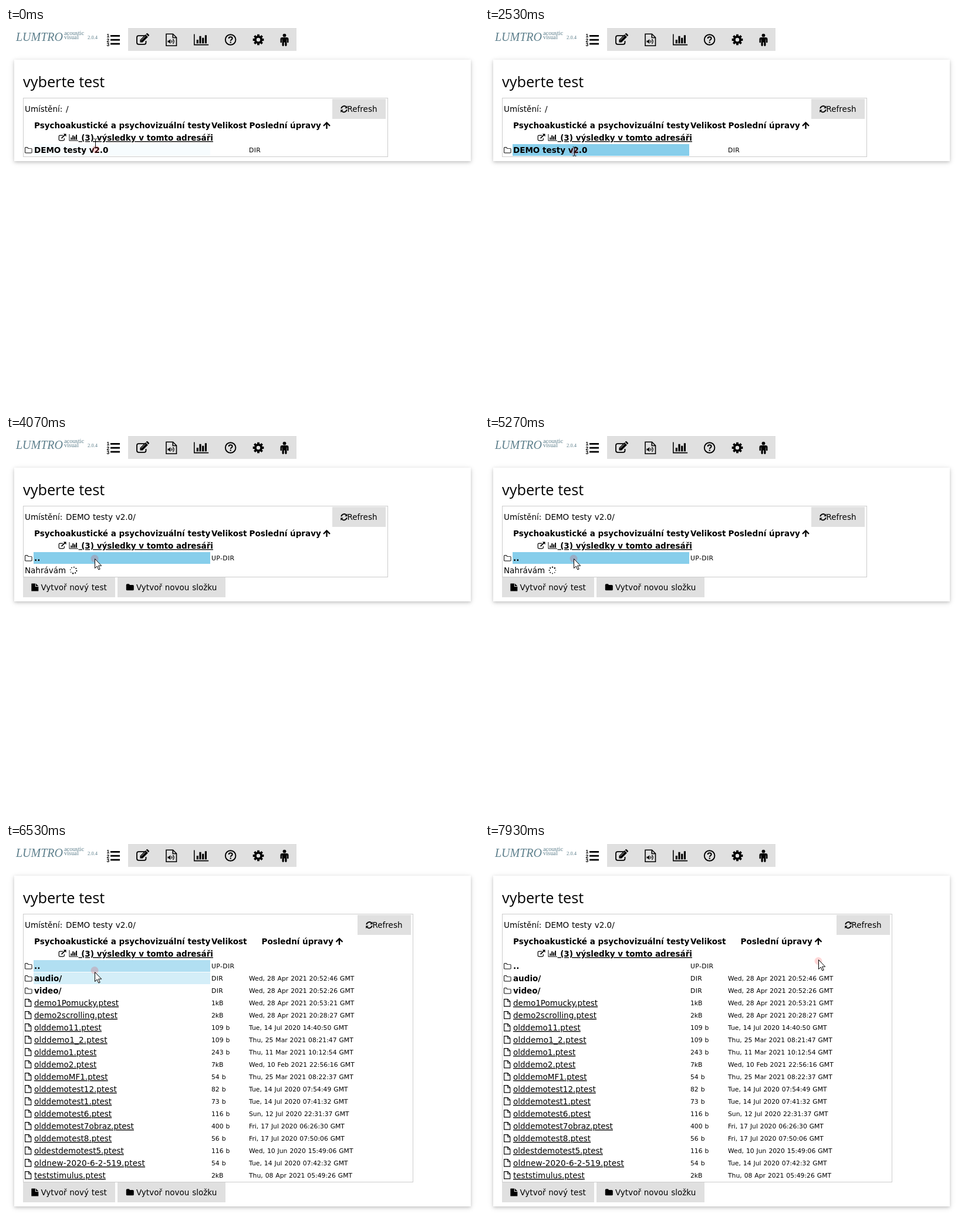
Animation, 806 px wide and 648 px high, one loop 8000 ms. Source, as an HTML page:

```html
<!DOCTYPE html>
<html lang="cs">
<head>
<meta charset="utf-8">
<title>vyberte test</title>
<style>
html, body { margin: 0; width: 100%; height: 100%; overflow: hidden; background: #fff; }
#card { position: absolute; left: 14px; top: 54px; width: 778px; background: #fff;
  box-shadow: 0 2px 5px rgba(0,0,0,.16), 0 2px 10px rgba(0,0,0,.12); }
svg { position: absolute; left: 0; top: 0; display: block; }
text { font: 13.5px "DejaVu Sans", sans-serif; word-spacing: .5px; white-space: pre; }
.b { font-weight: bold; word-spacing: 0; }
.u { text-decoration: underline 1px; }
.s { font-size: 10.8px; word-spacing: .5px; }
.h { font: 25.3px "Open Sans", sans-serif; word-spacing: 0; }
.logo { font: italic 20px "Liberation Serif", serif; fill: #5d7f8c; }
.tag { font: 10.4px "Liberation Serif", serif; fill: #5d7f8c; }
.ver { font: 8.5px "Liberation Serif", serif; fill: #5d7f8c; }
.num { font: bold 8.5px "Liberation Sans", sans-serif; }
.l { fill: none; stroke: #000; }
.btn { fill: #e0e0e0; }
.hl { fill: #87ceeb; }
</style>
</head>
<body>
<div id="card"></div>
<svg id="stage" width="806" height="648" viewBox="0 0 806 648"></svg>
<script>
const LOOP = 8000, STEP = 1000 / 15;
const OPEN = 3266, LOADED = 5866, DOWN = 6466, LEAVE = 7333;

const text = (x, y, s, cls = '', gap = 0) =>
  `<text x="${x}" y="${y}" class="${cls}"${gap ? ` letter-spacing="${gap}"` : ''}>${s}</text>`;
const rect = (x, y, w, h, cls = '', more = '') =>
  `<rect x="${x}" y="${y}" width="${w}" height="${h}" class="${cls}" ${more}/>`;
const path = (d, w) => w ? `<path d="${d}" class="l" stroke-width="${w}"/>` : `<path d="${d}"/>`;
const at = (x, y, s, id = '') => `<g ${id && `id="${id}"`} transform="translate(${x} ${y})">${s}</g>`;
const glyph = (size, d) => `<path transform="scale(${size / 1792})" d="${d}"/>`;

const chart = size => glyph(size, 'M640 896v512H384V896zM1024 384v1024H768V384zM2048 1536v128H0V128h128v1408z' +
  'M1408 640v768h-256V640zM1792 256v1152h-256V256z');

// Small icons, each drawn from its top left corner
const icon = {
  folder: glyph(13.5, 'M1536 1312V608q0-40-28-68t-68-28H736q-40 0-68-28t-28-68v-64q0-40-28-68t-68-28H224' +
    'q-40 0-68 28t-28 68v960q0 40 28 68t68 28h1216q40 0 68-28t28-68zm128-704v704q0 92-66 158t-158 66H224' +
    'q-92 0-158-66T0 1312V352q0-92 66-158t158-66h320q92 0 158 66t66 158v32h672q92 0 158 66t66 158z'),
  folderFull: path('M0 2Q0 .3 1.7.3h2.6Q6 .3 6 2h5.4Q13 2 13 3.7v6q0 1.6-1.6 1.6H1.7Q0 11.3 0 9.7z'),
  file: path('M.6 .6h6.2l4 4v8.3H.6zM6.7.6v4.1h4.1', 1.1),
  fileFull: path('M0 .5Q0 0 .6 0H6.5v5.5H12v7Q12 13 11.4 13H.6Q0 13 0 12.5zM7.5 0L12 4.5H7.5z'),
  refresh: path('M1.3 5.3A5 5 0 0 1 9.8 2.6M10.7 7.2A5 5 0 0 1 2.2 9.9', 1.9) +
    path('M11.7.6v4.5H7.2zM.3 11.9V7.4h4.5z'),
  link: path('M7.5 2.6H2.3Q.7 2.6.7 4.2v5.6q0 1.5 1.6 1.5h5.9q1.6 0 1.6-1.5V7.6', 1.2) +
    path('M5 7.6L11.5 1.2', 1.7) + path('M8.3 0H13v4.7z'),
  up: path('M6.5 1.5V12', 2.3) + path('M1 7L6.5 1.5L12 7', 2.3)
};

const polar = (r, a) => `${(r * Math.cos(a)).toFixed(2)} ${(r * Math.sin(a)).toFixed(2)}`;
const cog = () => {
  let d = '';
  for (let i = 0; i < 8; i++) {
    const a = i * Math.PI / 4;
    [[7, -.28], [9.5, -.2], [9.5, .2], [7, .28]].forEach(([r, o]) => d += (d ? 'L' : 'M') + polar(r, a + o));
  }
  return `<path fill-rule="evenodd" d="${d}zM3.2 0A3.2 3.2 0 1 0-3.2 0A3.2 3.2 0 1 0 3.2 0z"/>`;
};

function navBar() {
  return text(17, 22, 'LUMTRO', 'logo') + text(99, 12, 'acoustic', 'tag') +
    text(99, 19, 'visual', 'tag') + text(139, 19, '2.0.4', 'ver') +
    [0, 1, 2].map(i => text(171.5, 16 + i * 7.7, i + 1, 'num') +
      rect(178, 12 + i * 6.8, 16, 2.8)).join('') +
    rect(208, 0, 287, 39, 'btn') +
    path('M236 13.2H226Q223 13.2 223 16.2v8.6q0 3 3 3h9.5q3 0 3-3V22', 1.8) +
    path('M228.5 24.5v-4.2l9.2-9.2l4.2 4.2l-9.2 9.2zM238.6 10.2l1-1q.9-.7 1.8 0l2.3 2.3q.8.9 0 1.8l-1 1z') +
    '<path d="M230.5 20.8L237.5 13.8" stroke="#e0e0e0" stroke-width=".9"/>' +
    path('M273 10.3h11.5l6 6v14H273zM284.3 10.3v6.2h6.2', 1.6) +
    path('M275.5 21.5h2l2.8-2.6v8.2l-2.8-2.6h-2z') +
    path('M282.2 21q1.6 2 0 4M284.5 19q3.2 4 0 8', 1.3) +
    at(320, 9, chart(22)) +
    '<circle cx="382.6" cy="20" r="8.8" class="l" stroke-width="1.9"/>' +
    path('M379.6 18q0-2.7 3-2.7q3.1 0 3.1 2.5q0 1.4-1.7 2.3q-1.3.7-1.3 2', 1.9) +
    rect(381.6, 23.3, 2.2, 2.2) +
    at(430, 20, cog()) +
    '<circle cx="474.5" cy="12.6" r="2.9"/>' +
    path('M470.5 16h8q3 0 3 3v5q0 1.2-1.2 1.2t-1.2-1.2v-4.5h-.6V29.5q0 1.4-1.6 1.4t-1.6-1.4V24.5h-1.6' +
      'V29.5q0 1.4-1.6 1.4t-1.6-1.4V19.5h-.6V24q0 1.2-1.2 1.2t-1.2-1.2V19q0-3 3-3z');
}

function frameBox(right, bottom, place) {
  const wide = right > 651, dx = right - 651;
  return rect(29.5, 119.5, right - 30, bottom - 120, 'l', 'style="stroke:#ccc"') +
    rect(556 + dx, 121, 91, 34, 'btn') + at(570 + dx, 132, icon.refresh) +
    text(581.5 + dx, 143, 'Refresh') +
    text(32, 143, 'Umístění:') + text(102, 143, place) +
    text(48, 171, 'Psychoakustické a psychovizuální testy', 'b') + text(350, 171, 'Velikost', 'b') +
    text(wide ? 435.5 : 414.5, 171, 'Poslední úpravy', 'b') + at(wide ? 561.5 : 540, 160, icon.up) +
    at(89.5, 180.5, icon.link) + at(107.5, 180, chart(13.5)) +
    text(123.5, 192, ' (3) výsledky v tomto adresáři', 'b u');
}

function buttons(y) {
  return rect(29, y, 157, 34, 'btn') + rect(190, y, 184, 34, 'btn') +
    at(43.3, y + 10.5, icon.fileFull) + text(59.5, y + 22, 'Vytvoř nový test') +
    at(204.8, y + 11, icon.folderFull) + text(222, y + 22, 'Vytvoř novou složku');
}

const folderRow = (y, name) => at(32, y + 2, icon.folder) + text(48, y + 13, name, 'b');
const small = (x, y, s) => text(x, y + 12, s, 's', /DIR/.test(s) ? .4 : 0);

const files = `demo1Pomucky|1kB|Wed, 28 Apr 2021 20:53:21
demo2scrolling|2kB|Wed, 28 Apr 2021 20:28:27
olddemo11|109 b|Tue, 14 Jul 2020 14:40:50
olddemo1_2|109 b|Thu, 25 Mar 2021 08:21:47
olddemo1|243 b|Thu, 11 Mar 2021 10:12:54
olddemo2|7kB|Wed, 10 Feb 2021 22:56:16
olddemoMF1|54 b|Thu, 25 Mar 2021 08:22:37
olddemotest12|82 b|Tue, 14 Jul 2020 07:54:49
olddemotest1|73 b|Tue, 14 Jul 2020 07:41:32
olddemotest6|116 b|Sun, 12 Jul 2020 22:31:37
olddemotest7obraz|400 b|Fri, 17 Jul 2020 06:26:30
olddemotest8|56 b|Fri, 17 Jul 2020 07:50:06
oldestdemotest5|116 b|Wed, 10 Jun 2020 15:49:06
oldnew-2020-6-2-519|54 b|Tue, 14 Jul 2020 07:42:32
teststimulus|2kB|Thu, 08 Apr 2021 05:49:26`.split('\n').map((line, i) => {
  const [name, size, date] = line.split('|'), y = 263 + i * 21;
  return at(32, y + 1, icon.file) + text(48, y + 13, name + '.ptest', 'u', /[-_]/.test(name) ? .2 : 0) +
    small(350, y, size) + small(414, y, date + ' GMT');
}).join('');

const dots = [...Array(8)].map((_, i) => {
  const [x, y] = polar(5.4, i * Math.PI / 4).split(' ');
  return `<circle cx="${x}" cy="${y}" r="${.75 + .07 * i}"/>`;
}).join('');

const views = [
  frameBox(651, 220, '/') + folderRow(200, 'DEMO testy v2.0') + small(414, 200, 'DIR'),
  frameBox(651, 241, 'DEMO testy v2.0/') + folderRow(200, '..') + small(350, 200, 'UP-DIR') +
    text(32, 234, 'Nahrávám') + at(115, 229, `<g id="spin">${dots}</g>`) + buttons(241),
  frameBox(694, 577, 'DEMO testy v2.0/') + folderRow(200, '..') + small(350, 200, 'UP-DIR') +
    folderRow(221, 'audio/') + small(350, 221, 'DIR') + small(414, 221, 'Wed, 28 Apr 2021 20:52:46 GMT') +
    folderRow(242, 'video/') + small(350, 242, 'DIR') + small(414, 242, 'Wed, 28 Apr 2021 20:52:26 GMT') +
    files + buttons(577)
];
const heights = [173, 228, 564];

const $ = id => document.getElementById(id);
$('stage').innerHTML = navBar() + text(29, 101, 'vyberte test', 'h') +
  rect(47, 198, 301, 20, 'hl', 'id="row1"') + rect(47, 219, 301, 20, 'hl', 'id="row2"') +
  views.map((v, i) => `<g id="view${i}">${v}</g>`).join('') +
  '<circle id="halo" r="6.5" fill="#f00" fill-opacity=".16"/>' +
  at(0, 0, path('M-3-7.5h2.2L0-6.8L.8-7.5H3M0-6.8V6.8M-3 7.5h2.2L0 6.8L.8 7.5H3', 1), 'beam') +
  at(0, 0, '<path d="M.5.5V16.5L4.2 13L6.8 19L9.2 18L6.6 12.2H11.7z" fill="#fff" stroke="#000"/>', 'arrow');

// Pointer path: time, x, y
const track = [
  [-67, 153, 207], [0, 152, 196], [67, 152, 203], [200, 152.5, 209], [733, 152.5, 210.5],
  [3200, 152, 210], [OPEN, 151, 209], [6333, 151, 209], [6400, 151, 213], [6533, 151, 218],
  [7066, 151, 218], [7133, 163, 220], [7333, 370, 218], [7533, 545, 208], [7666, 568, 204],
  [7800, 568, 204], [7866, 568, 199.5], [7933, 568, 197]
];
function pointer(t) {
  const n = track.findIndex(p => p[0] > t);
  if (n < 1) return track[n ? track.length - 1 : 0].slice(1);
  const [a, b] = [track[n - 1], track[n]], k = (t - a[0]) / (b[0] - a[0]);
  return [a[1] + (b[1] - a[1]) * k, a[2] + (b[2] - a[2]) * k];
}

// CSS "ease" over 300 ms
function fade(ms) {
  const x = Math.min(1, Math.max(0, ms / 300));
  let lo = 0, hi = 1;
  for (let i = 0; i < 18; i++) {
    const u = (lo + hi) / 2;
    if (.75 * u * (1 - u) + u ** 3 < x) lo = u; else hi = u;
  }
  return 3 * lo * (1 - lo) ** 2 * .1 + 3 * lo * lo * (1 - lo) + lo ** 3;
}

function render(time) {
  // The screen updates 15 times a second
  const t = Math.floor((time + 20) / STEP) % 120 * STEP;
  const state = t < OPEN ? 0 : t < LOADED ? 1 : 2;
  views.forEach((_, i) => $('view' + i).style.display = i === state ? '' : 'none');
  $('card').style.height = heights[state] + 'px';

  const start = [-25, OPEN, LOADED + 8][state];
  $('row1').style.opacity = fade(t - start) * (1 - fade(t - DOWN));
  $('row2').style.opacity = fade(t - DOWN) * (1 - fade(t - LEAVE));
  $('spin').setAttribute('transform', `rotate(${(t - OPEN) * .18})`);

  const [x, y] = pointer(t), [hx, hy] = pointer(t - STEP);
  $('halo').setAttribute('cx', hx);
  $('halo').setAttribute('cy', hy);
  const [shown, hidden] = state ? ['arrow', 'beam'] : ['beam', 'arrow'];
  const half = state ? 0 : .5;
  $(shown).setAttribute('transform', `translate(${Math.round(x) + half} ${Math.round(y) + half})`);
  $(shown).style.display = '';
  $(hidden).style.display = 'none';
}

const began = performance.now();
function tick() {
  render((performance.now() - began) % LOOP);
  requestAnimationFrame(tick);
}
tick();
</script>
</body>
</html>
```
